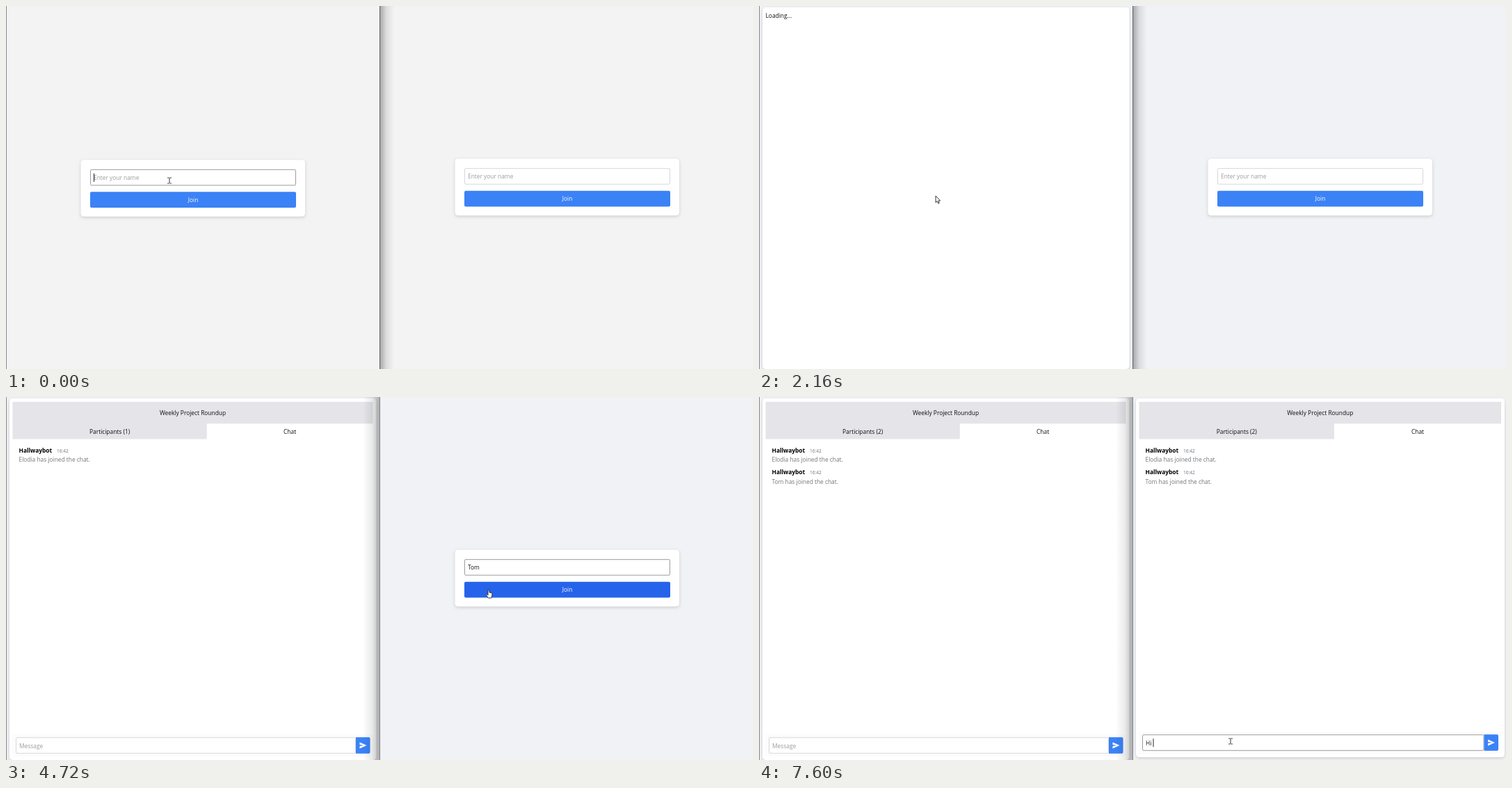
These frames come from a looping animation (1074x522 px, 8000 ms). An HTML page with a canvas:

```html
<!DOCTYPE html>
<html lang="en">
<head>
<meta charset="utf-8">
<title>Two chat windows</title>
<style>
html, body { margin: 0; width: 100%; height: 100%; overflow: hidden; background: #f1f2f6; }
canvas { display: block; }
</style>
</head>
<body>
<canvas id="stage" width="1074" height="522"></canvas>
<script>
const ctx = document.getElementById('stage').getContext('2d');
const LOOP = 8000, STEP = 80;
const FONT = '"Open Sans", sans-serif';
const BLUE = '#3b82f6', HOVER = '#2563eb', PANEL = '#e4e4e9', HINT = '#9b9b9e';
const GUEST = 'Elodia', FRIEND = 'Tom';

// Pointer path: time, x, y, shape used until the next entry
const POINTER = [
  [0, 235, 251, 'beam'], [240, 238, 256, 'beam'], [1680, 238, 256, 'beam'],
  [1840, 244, 268, 'hand'], [2080, 254, 273, 'arrow'], [2160, 254, 273, 'arrow'],
  [2240, 286, 287, 'arrow'], [2320, 286, 287, 'arrow'], [2800, 668, 250, 'beam'],
  [2880, 674, 248, 'beam'], [4640, 674, 248, 'beam'], [4720, 694, 277, 'hand'],
  [4880, 694, 277, 'hand'], [4960, 692, 284, 'arrow'], [5280, 685, 304, 'arrow'],
  [5520, 685, 304, 'arrow'], [5920, 656, 491, 'beam'], [6160, 656, 495, 'beam'],
  [7520, 656, 495, 'beam'], [7600, 678, 495, 'beam'], [LOOP, 678, 495, 'beam']
];

function box(x, y, w, h, fill, radius = 0, stroke) {
  ctx.beginPath();
  ctx.roundRect(x, y, w, h, radius);
  ctx.fillStyle = fill;
  ctx.fill();
  if (stroke) {
    ctx.strokeStyle = stroke;
    ctx.lineWidth = 1;
    ctx.stroke();
  }
}

function card(x, y, w, h) {
  ctx.save();
  ctx.shadowColor = 'rgba(0,0,0,.16)';
  ctx.shadowBlur = 4;
  ctx.shadowOffsetY = 1.5;
  box(x, y, w, h, '#fff', 4.5);
  ctx.restore();
}

function text(str, x, y, { color = '#111', size = 8.4, weight = 400, align = 'left' } = {}) {
  ctx.font = `${weight} ${size}px ${FONT}`;
  ctx.textAlign = align;
  ctx.fillStyle = color;
  ctx.fillText(str, x, y);
}

function field(x, y, w, { value = '', hint, focus, caret }) {
  box(x + .5, y + .5, w - 1, 22.5, '#fff', 1.5, focus ? '#9c9c9f' : '#d6d7db');
  text(value || hint, x + 5, y + 15.2, { color: value ? '#111' : HINT });
  if (caret) box(x + 5 + (value ? ctx.measureText(value).width : 0), y + 6, 1, 12, '#222');
}

function login(x, y, input, hover) {
  card(x, y, 322.5, 81.5);
  field(x + 13.5, y + 13.5, 296, { hint: 'Enter your name', ...input });
  box(x + 13.5, y + 46, 296, 22.7, hover ? HOVER : BLUE, 2);
  text('Join', x + 161.5, y + 60.5, { color: '#fff', align: 'center' });
}

function loading(x, w, bottom) {
  card(x, 2, w, bottom - 2);
  text('Loading...', x + 4.5, 17);
}

function chat(x, w, bottom, people, input) {
  const left = x + 4.5, inner = w - 9.5, tab = inner * .539;
  const center = { align: 'center' };
  card(x, 2, w, bottom - 2);
  box(left, 7, inner, 31.3, PANEL);
  box(left, 38, tab, 22.5, PANEL);
  text('Weekly Project Roundup', left + inner / 2, 26, center);
  text(`Participants (${people.length})`, left + tab / 2, 53, center);
  text('Chat', left + (tab + inner) / 2, 53, center);
  people.forEach((name, i) => {
    const y = 80 + i * 31.3;
    text('Hallwaybot', x + 13.5, y, { weight: 700, color: '#000' });
    text('16:42', x + 68, y, { size: 6.6, color: '#6b7280' });
    text(`${name} has joined the chat.`, x + 13.5, y + 13.2, { color: '#747678' });
  });

  const top = bottom - 32.7, send = x + w - 29.5;
  box(left, top - 4, inner, 32, '#fcfcfd');
  field(x + 9, top, send - x - 9, { hint: 'Message', ...input });
  box(send, top, 20.5, 23.5, BLUE, [0, 2, 2, 0]);
  shape(send + 5.5, top + 7.2, [0, 0, 10, 4.5, 0, 9, 0, 5.6, 6, 4.5, 0, 3.4], '#fff');
}

function shape(x, y, points, fill, stroke) {
  ctx.beginPath();
  for (let i = 0; i < points.length; i += 2) ctx.lineTo(x + points[i], y + points[i + 1]);
  ctx.closePath();
  ctx.fillStyle = fill;
  ctx.fill();
  if (stroke) {
    ctx.strokeStyle = stroke;
    ctx.lineWidth = .9;
    ctx.lineJoin = 'round';
    ctx.stroke();
  }
}

const cursors = {
  beam(x, y) {
    box(x - .5, y - 4, 1, 8, '#333');
    for (const end of [-4.5, 3.5]) {
      box(x - 3, y + end, 2.5, 1, '#444');
      box(x + .5, y + end, 2.5, 1, '#444');
    }
  },
  arrow(x, y) {
    shape(x, y, [0, 0, 0, 9.6, 2.2, 7.6, 3.8, 11, 5.3, 10.3, 3.8, 7, 6.6, 7], '#fff', '#222');
  },
  hand(x, y) {
    shape(x, y, [-1, .4, 0, 0, .9, .5, 1, 4, 3.8, 4.6, 5, 5.6, 4.8, 9, 3.8, 12,
      -.6, 12, -3.2, 8.2, -3.4, 6.8, -2.4, 6.5, -1, 8], '#fff', '#222');
  }
};

function pointer(t) {
  const i = POINTER.findIndex((p, n) => t >= p[0] && t < POINTER[n + 1][0]);
  const [t0, x0, y0, kind] = POINTER[i], [t1, x1, y1] = POINTER[i + 1];
  const k = (t - t0) / (t1 - t0);
  cursors[kind](x0 + (x1 - x0) * k, y0 + (y1 - y0) * k);
}

function shade(from, to, strength) {
  const g = ctx.createLinearGradient(from, 0, to, 0);
  g.addColorStop(0, `rgba(0,0,0,${strength})`);
  g.addColorStop(.45, `rgba(0,0,0,${strength * .3})`);
  g.addColorStop(1, 'rgba(0,0,0,0)');
  box(Math.min(from, to), 0, Math.abs(to - from), 522, g);
}

// Number of letters typed, given the time of each keystroke
const typed = (word, times, t) => word.slice(0, times.filter(k => t >= k).length);

function leftWindow(t) {
  if (t < 2080) {
    const value = typed(GUEST, [400, 560, 800, 1040, 1200, 1440], t);
    const caret = t < 80 || t >= 240;
    login(107.5, 221.3, { value, focus: true, caret }, t >= 1840);
  } else if (t < 2240) {
    loading(5, 527.5, 522);
  } else {
    chat(5, 527.5, 522, t < 5200 ? [GUEST] : [GUEST, FRIEND], {});
  }
}

function rightWindow(t) {
  if (t < 4960) {
    const value = typed(FRIEND, [4080, 4160, 4160], t);
    login(645.5, 219.7, { value, focus: t >= 3040, caret: value && t < 4720 }, t >= 4720);
  } else if (t < 5200) {
    loading(542, 530, 518);
  } else {
    const focus = t >= 6400;
    chat(542, 530, 518, [GUEST, FRIEND], { value: t >= 7440 ? 'Hi ' : '', focus, caret: focus });
  }
}

function draw(t) {
  const fade = Math.min(t / 800, 1);
  box(0, 0, 1074, 522, `rgb(${243 - 2 * fade},${243 - fade},${243 + 3 * fade})`);
  leftWindow(t);
  rightWindow(t);
  const rightActive = t >= 2800;
  if (rightActive) shade(537, 513, .27);
  else shade(538, 558, .3);
  box(0, 0, 1, 522, '#858588');
  box(537, 0, 1, 522, rightActive ? '#858588' : '#606063');
  pointer(t);
}

function frame() {
  const t = performance.now() % LOOP;
  draw(Math.floor(t / STEP) * STEP);
  requestAnimationFrame(frame);
}
frame();
</script>
</body>
</html>
```
